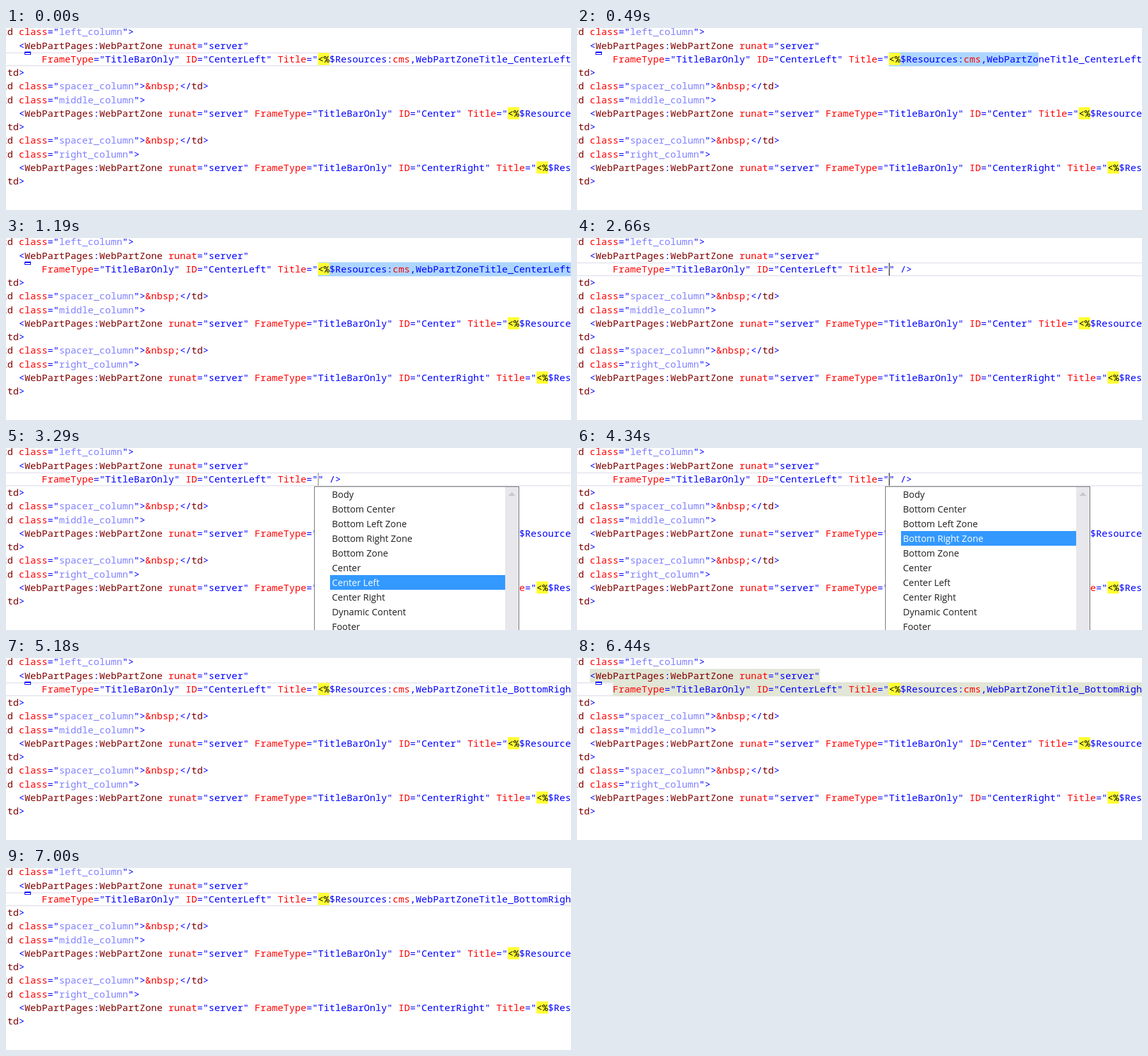
Recreate the animation shown at these times as an HTML page with a canvas. Size 884x285 px, loop 7070 ms.

```html
<!DOCTYPE html>
<html lang="en">
<head>
<meta charset="utf-8">
<title>Code editor</title>
<style>
html, body { margin: 0; width: 100%; height: 100%; overflow: hidden; background: #fff; }
canvas { display: block; }
</style>
</head>
<body>
<canvas id="stage" width="884" height="285"></canvas>
<script>
const LOOP = 7070, W = 884, CHAR = 9, LEFT = -16, FIELD = 488;
const ctx = document.getElementById('stage').getContext('2d');

// Each run of a code line starts with its colour key; k also gets a yellow back.
const INK = { b: '#0000ff', m: '#800000', r: '#ff0000', v: '#8080ff', k: '#000000' };
const ITEMS = ['Body', 'Bottom Center', 'Bottom Left Zone', 'Bottom Right Zone', 'Bottom Zone',
  'Center', 'Center Left', 'Center Right', 'Dynamic Content', 'Footer'];

const open = name => `b<|mtd |rclass|b="|v${name}_column|b">`;
const close = 'b</|mtd|b>';
const spacer = open('spacer') + '|r&nbsp;|' + close;
const server = 'b    <|mWebPartPages|b:|mWebPartZone |rrunat|b="server"';
const attrs = id => `rFrameType|b="TitleBarOnly" |rID|b="${id}" |rTitle|b="`;
const resource = (name, cms = 'r') => `k<%|b$Resources:|${cms}cms|b,WebPartZoneTitle_${name}" />`;
const zone = id => `${server}|b |${attrs(id)}|${resource(id)}`;

function box(color, x, y, w, h) {
  ctx.fillStyle = color;
  ctx.fillRect(x, y, w, h);
}

function codeLine(row, line) {
  const base = Math.round(11.4 + 21.25 * row);
  let x = LEFT;
  ctx.font = '15px "Noto Sans Mono", "DejaVu Sans Mono", monospace';
  for (const run of line.split('|')) {
    const text = run.slice(1), width = text.length * CHAR;
    if (run[0] === 'k') box('#ffff33', x, base - 15, width, 19);
    ctx.fillStyle = INK[run[0]];
    ctx.fillText(text, x, base);
    x += width;
  }
}

function selectedChars(t) {
  const step = Math.floor(t / 70);
  return step <= 11 ? Math.round(41 * step / 11) : Math.min(44, 41 + (step - 11) * 0.73);
}

function caretAlpha(t) {
  if (t < 2940) return 1;
  if (t < 3010) return 0.5;
  if (t < 3290) return 0;
  if (t < 3360) return 0.5;
  if (t < 3850) return 1;
  return t < 4270 ? 0.5 : 1;
}

function popup(t) {
  const chosen = t < 3990 ? 6 : t < 4130 ? 5 : t < 4270 ? 4 : 3;
  box('#717171', 482, 60, 321, 230);
  box('#ffffff', 483, 61, 298, 230);
  box('#e8e8ec', 781, 61, 21, 230);
  ctx.fillStyle = '#c6c8d2';
  ctx.beginPath();
  ctx.moveTo(786, 75);
  ctx.lineTo(791.5, 69);
  ctx.lineTo(797, 75);
  ctx.fill();
  ctx.font = '14.4px "Open Sans", "Noto Sans", sans-serif';
  ITEMS.forEach((item, i) => {
    const y = 61 + 23 * i;
    if (i === chosen) box('#3399ff', 507, y, 274, 23);
    ctx.fillStyle = i === chosen ? '#ffffff' : '#1e1e1e';
    ctx.fillText(item, 510, y + 17);
  });
}

function draw(t) {
  const selecting = t >= 70 && t < 2660;
  const empty = t >= 2660 && t < 4830;
  box('#ffffff', 0, 0, W, 285);

  if (selecting) {
    box('#add6ff', FIELD, 38, selectedChars(t) * CHAR, 22);
  } else {
    box('#eaeaf2', 0, 38, W, 2);
    box('#eaeaf2', 0, 58, W, 2);
  }
  if (t >= 5600 && t < 7000) {
    box('#e2e6d6', 20, 17, 360, 21);
    box('#e2e6d6', 56, 38, W - 56, 22);
  }

  const title = empty ? 'b" />'
    : t < 2660 ? resource('CenterLeft')
    : resource('BottomRight', t < 5180 ? 'b' : 'r');
  [open('left'), server, `b        |${attrs('CenterLeft')}|${title}`, close,
    spacer, open('middle'), zone('Center'), close,
    spacer, open('right'), zone('CenterRight'), close
  ].forEach((line, row) => codeLine(row, line));

  if (t < 2660 || t >= 4900) {
    box('#0000ff', 29, 37, 10, 5);
    box('#ffffff', 30, 39, 8, 2);
  }
  if (empty) {
    ctx.globalAlpha = caretAlpha(t);
    box('#000000', FIELD, 39, 1, 20);
    ctx.globalAlpha = 1;
  }
  if (t >= 3290 && t < 4830) popup(t);
}

function frame() {
  draw(performance.now() % LOOP);
  requestAnimationFrame(frame);
}
frame();
</script>
</body>
</html>
```
